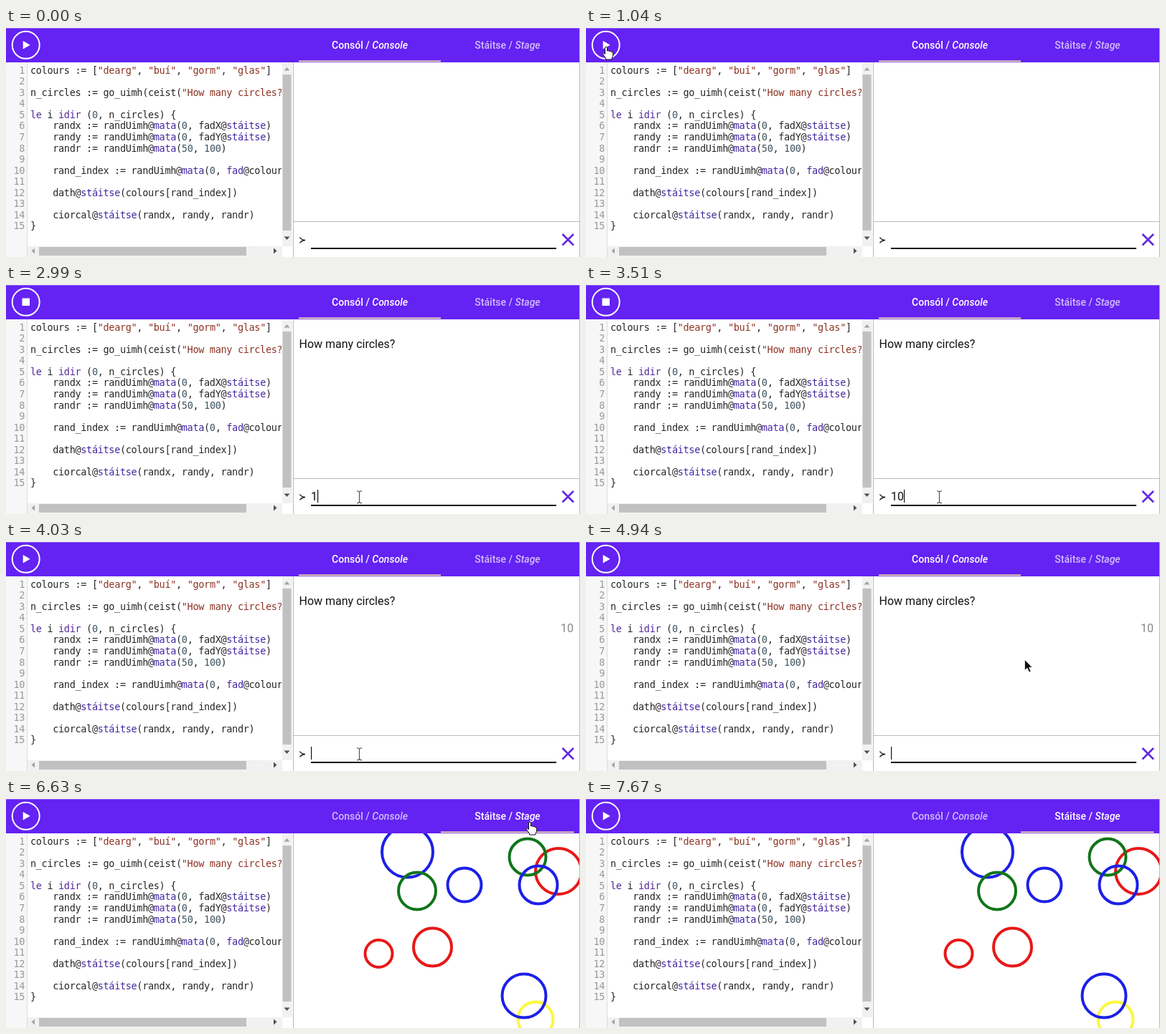
An HTML page for the animation above (7.8 s loop, 800x320 px).

```html
<!DOCTYPE html>
<html lang="ga">
<head>
<meta charset="utf-8">
<title>Console and stage</title>
<style>
html, body { margin: 0; width: 100%; height: 100%; overflow: hidden; background: #fff; }
svg { display: block; }
text { white-space: pre; font-family: Roboto, sans-serif; font-size: 16px; fill: #111; }
.code text { font-family: "DejaVu Sans Mono", monospace; font-size: 13.5px; letter-spacing: -.32px; fill: #262626; }
.code .num { fill: #999; text-anchor: end; }
.str { fill: #8c3324; }
.int { fill: #3f5560; }
.key { fill: #55289a; }
.lib { fill: #4326a0; }
.tab { font-size: 14px; font-weight: 500; fill: #fff; text-anchor: middle; }
.it { font-style: italic; }
</style>
</head>
<body>
<svg width="800" height="320" viewBox="0 0 800 320">
  <defs>
    <clipPath id="editClip"><rect x="30" y="48" width="354" height="257"/></clipPath>
    <clipPath id="paneClip"><rect x="401" y="48" width="399" height="272"/></clipPath>
    <clipPath id="tabClip"><rect x="606" y="0" width="186" height="48"/></clipPath>
  </defs>
  <rect width="800" height="320" fill="#fff"/>

  <rect y="48" width="29" height="272" fill="#f7f7f7"/>
  <path d="M29.500 48V320" stroke="#ddd"/>
  <g class="code" id="nums"></g>
  <g class="code" id="code" clip-path="url(#editClip)"></g>

  <rect x="385" y="48" width="14" height="257" fill="#f1f1f1"/>
  <rect x="385.500" y="65" width="12" height="218" fill="#c1c1c1"/>
  <path d="M387.500 59.500h8l-4-4.500z" fill="#a3a3a3"/>
  <path d="M387.500 291.500h8l-4 4.500z" fill="#505050"/>
  <rect x="30" y="305" width="355" height="15" fill="#f1f1f1"/>
  <rect x="46" y="306" width="289" height="12" fill="#c1c1c1"/>
  <path d="M40 307.500v8l-4.500-4z" fill="#a3a3a3"/>
  <path d="M373 307.500v8l4.500-4z" fill="#505050"/>
  <rect x="385" y="305" width="15" height="15" fill="#fff"/>
  <path d="M400.500 48V320" stroke="#bbb"/>

  <g id="console">
    <text id="ask" x="408.500" y="88">How many circles?</text>
    <text id="reply" x="791" y="126" text-anchor="end" style="fill:#888">10</text>
    <path d="M401 270.500H800" stroke="#bbb"/>
    <path d="M409.500 292.500Q411.500 296 417 296.500Q411.500 297 409.500 300.500" fill="none" stroke="#222" stroke-width="1.500"/>
    <path d="M425 308H767" stroke="#111" stroke-width="2"/>
    <text id="typed" x="425" y="301"></text>
    <path id="caret" d="M0 286V304" stroke="#111" stroke-width="1.200"/>
    <path d="M775.500 288l15.500 15.500m0-15.500l-15.500 15.500" stroke="#6427e0" stroke-width="2.600"/>
  </g>
  <g id="stage" clip-path="url(#paneClip)" fill="none" stroke-width="4"></g>

  <rect width="800" height="48" fill="#6422f3"/>
  <path d="M0 .500H800" stroke="#fff" stroke-opacity=".25"/>
  <path d="M799.500 0V320" stroke="#bbb"/>
  <circle id="ripple" cx="732" cy="36" fill="#ffe88a" clip-path="url(#tabClip)"/>
  <circle cx="27.700" cy="23.800" r="19" fill="none" stroke="#fff" stroke-width="2"/>
  <path id="play" d="M23.700 18v11.500l10-5.750z" fill="#fff"/>
  <rect id="stop" x="22.500" y="18.500" width="10.500" height="10.500" fill="#fff"/>
  <text class="tab" id="tabA" x="507" y="29">Consól / <tspan class="it">Console</tspan></text>
  <text class="tab" id="tabB" x="699" y="29">Stáitse / <tspan class="it">Stage</tspan></text>
  <rect id="bar" y="45.500" height="1.700" fill="#fbeaa2"/>

  <g id="mouse">
    <path id="arrow" d="M0 0V15.500L3.700 12.200L6.300 18L9 16.800L6.500 11.200H11z" fill="#111" stroke="#fff"/>
    <path id="beam" d="M-3.500-8.500Q0-8.500 0-6.500Q0-8.500 3.500-8.500M0-6.500V6.500M-3.500 8.500Q0 8.500 0 6.500Q0 8.500 3.500 8.500" fill="none" stroke="#555" stroke-width="1.200"/>
    <path id="hand" d="M-1.500 1Q0-1 1.500 1V6Q3 4.800 4.300 6.500Q6 5.500 7.200 7.300Q9.500 6.500 9.700 9V12Q9.500 14 8 16V18H-.500V16Q-3 13.500-5 9.500Q-4.500 7.500-1.500 10.500z" fill="#fff" stroke="#111"/>
  </g>
</svg>
<script>
const LOOP = 7800, STEP = 130;
const $ = id => document.getElementById(id);
const show = (id, on) => { $(id).style.display = on ? "" : "none"; };

const lines = [
  'colours := ["dearg", "buí", "gorm", "glas"]',
  '',
  'n_circles := go_uimh(ceist("How many circles?"))',
  '',
  'le i idir (0, n_circles) {',
  '    randx := randUimh@mata(0, fadX@stáitse)',
  '    randy := randUimh@mata(0, fadY@stáitse)',
  '    randr := randUimh@mata(50, 100)',
  '',
  '    rand_index := randUimh@mata(0, fad@colours)',
  '',
  '    dath@stáitse(colours[rand_index])',
  '',
  '    ciorcal@stáitse(randx, randy, randr)',
  '}'
];
const token = /("[^"]*")|(\b\d+)|(\ble\b|\bidir\b)|(mata|stáitse|fad(?=@))/g;
const kinds = ["str", "int", "key", "lib"];
const paint = line => line.replace(token, (m, ...g) =>
  `<tspan class="${kinds[g.findIndex(Boolean)]}">${m}</tspan>`);
const rowY = i => 63.8 + i * 15.53;
$("code").innerHTML = lines.map((s, i) => `<text x="34" y="${rowY(i)}">${paint(s)}</text>`).join("");
$("nums").innerHTML = lines.map((s, i) => `<text class="num" x="26" y="${rowY(i)}">${i + 1}</text>`).join("");

const blue = "#1d20e6", green = "#11751a", red = "#e81818", yellow = "#fdf742";
$("stage").innerHTML = [
  [559.5, 74, 35.5, blue], [573, 128.5, 26, green], [639, 120, 23.5, blue],
  [770, 101, 32, red], [727, 81, 25.5, green], [742, 120, 26.5, blue],
  [519.5, 216, 19, red], [594.5, 207, 26.5, red],
  [738, 308, 24.5, yellow], [722, 275, 30.5, blue]
].map(([x, y, r, c]) => `<circle cx="${x}" cy="${y}" r="${r}" stroke="${c}"/>`).join("");

// Rows of [time, values...], eased between rows
const path = [
  [260, 230, 330], [910, 28, 26], [1300, 28, 26], [1950, 462, 219], [2340, 492.5, 296.3],
  [4550, 492.5, 296.3], [5330, 730, 32], [6630, 730, 32], [7150, 760, -22]
];
const barRows = [
  [5590, 408, 606], [5720, 408, 620], [5850, 478, 742], [5980, 570, 786], [6110, 606, 791.5]
];
const rippleRows = [[5460, 0, 0.24], [5590, 60, 0.24], [5720, 123, 0.22], [5850, 190, 0.2], [6370, 190, 0]];

function sample(rows, t, ease = k => k) {
  if (t <= rows[0][0]) return rows[0].slice(1);
  const i = rows.findIndex(r => r[0] >= t);
  if (i < 0) return rows[rows.length - 1].slice(1);
  const a = rows[i - 1], b = rows[i], k = ease((t - a[0]) / (b[0] - a[0]));
  return a.slice(1).map((v, n) => v + (b[n + 1] - v) * k);
}
const smooth = k => k * k * (3 - 2 * k);

function pointer(x, y) {
  if (y < 48) return x < 48 || x > 408 ? "hand" : "arrow";
  if (x < 384 && y < 305) return "beam";
  return x > 425 && x < 767 && y > 282 && y < 308 ? "beam" : "arrow";
}

function draw(t) {
  const running = t >= 1170 && t < 3770, staged = t >= 5590;
  show("play", !running);
  show("stop", running);
  show("console", !staged);
  show("stage", staged);
  show("ask", t >= 1170);
  show("reply", t >= 3640);
  $("tabA").style.opacity = staged ? 0.7 : 1;
  $("tabB").style.opacity = staged ? 1 : 0.7;

  const text = t < 2860 || t >= 3640 ? "" : t < 3250 ? "1" : "10";
  $("typed").textContent = text;
  show("caret", t >= 2470);
  $("caret").setAttribute("transform", `translate(${425.6 + text.length * 9})`);

  const [l, r] = sample(barRows, t);
  $("bar").setAttribute("x", l);
  $("bar").setAttribute("width", r - l);
  const [rad, alpha] = sample(rippleRows, t);
  $("ripple").setAttribute("r", rad);
  $("ripple").style.opacity = alpha;

  const [x, y] = sample(path, t, smooth), kind = pointer(x, y);
  show("mouse", t > 260 && t < 7150);
  $("mouse").setAttribute("transform", `translate(${x} ${y})`);
  for (const id of ["arrow", "beam", "hand"]) show(id, id === kind);
}

const start = performance.now();
function tick() {
  const t = (performance.now() - start) % LOOP;
  draw(Math.floor(t / STEP) * STEP);
  requestAnimationFrame(tick);
}
tick();
</script>
</body>
</html>
```
